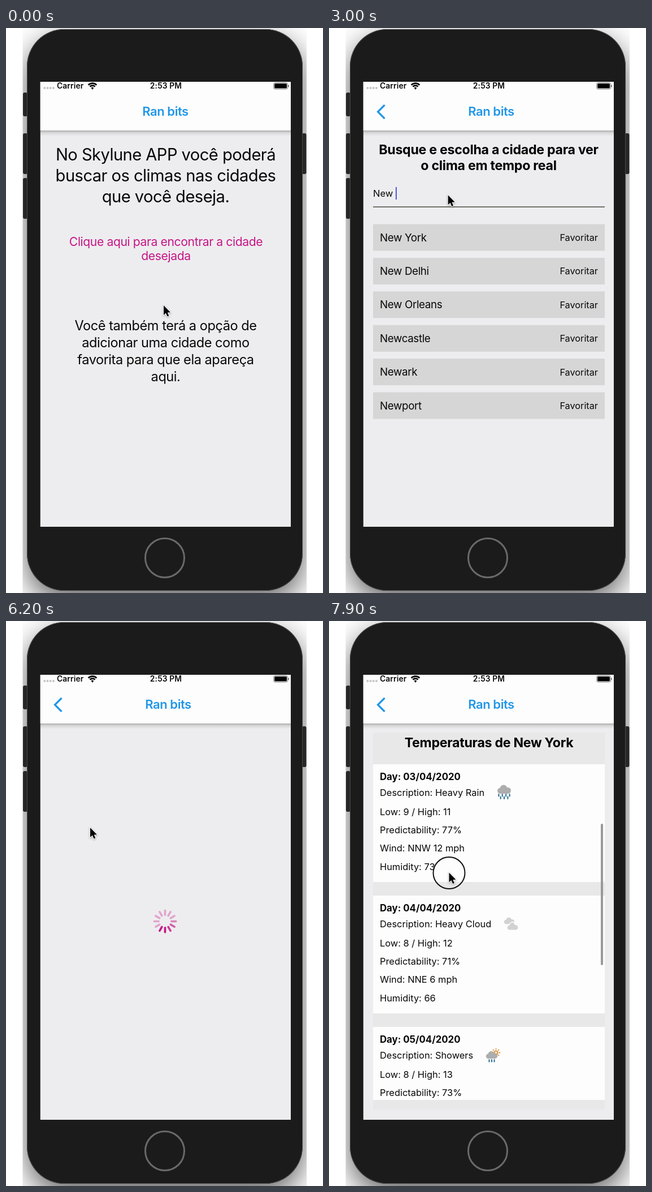
An HTML page with a canvas for the animation above (8000 ms loop, 561 by 998 pixels).

```html
<!DOCTYPE html>
<html lang="pt">
<head>
<meta charset="utf-8">
<title>Clima</title>
<style>
html, body { margin: 0; width: 561px; height: 998px; overflow: hidden; background: #fff; }
canvas { display: block; }
</style>
</head>
<body>
<canvas id="stage" width="561" height="998"></canvas>
<script>
const c = document.getElementById('stage').getContext('2d');
const LOOP = 8000, LEFT = 60.5, TOP = 95, W = 443.5, H = 786;
const BLUE = '#2196e8', PINK = '#c71585', BG = '#ededef', INK = '#080808';
const HEADING = { weight: 700, align: 'center', track: -.013, color: '#000' };

// Key lists: [time, value, value...]
const pointerKeys = [[0, 279, 490], [700, 252, 388], [1300, 246, 380], [1600, 217, 305],
  [2000, 214, 298], [3500, 209, 294], [4000, 207, 298], [4700, 160, 378], [5000, 159, 376],
  [5400, 149, 365], [7000, 149, 365], [7300, 214, 680]];
const openSearch = [[900, 0], [1000, .15], [1200, .15], [1300, .65], [1400, .9], [1600, 1]];
const openResult = [[5000, 0], [5100, .3], [5200, .75], [5300, .95], [5400, 1]];
const scrollKeys = [[7300, 0], [7400, 18], [7700, 180], [7900, 243]];
const typed = [[2300, 'N'], [2500, 'Ne'], [2700, 'New'], [3000, 'New '], [3300, 'New Y'], [3900, 'New Yo']];
const counts = [[2700, 9], [3000, 6], [3300, 3], [4100, 1]];
const cities = ['New York', 'New Delhi', 'New Orleans', 'Newcastle', 'Newark', 'Newport',
  'Geneva', 'Minneapolis', 'Budapest'];
const days = [
  ['02', 'Light Cloud', 6, 14, 70, 'NNW 12', 50, 313, 'sun'],
  ['03', 'Heavy Rain', 9, 11, 77, 'NNW 12', 73, 310, 'rain'],
  ['04', 'Heavy Cloud', 8, 12, 71, 'NNE 6', 66, 322, 'clouds'],
  ['05', 'Showers', 8, 13, 73, 'NNW 8', 61, 290, 'sun rain']];

function at(keys, t) {
  let i = keys.findIndex(k => k[0] > t);
  if (i < 0) return keys[keys.length - 1].slice(1);
  if (!i) return keys[0].slice(1);
  const a = keys[i - 1], b = keys[i], p = (t - a[0]) / (b[0] - a[0]);
  return a.slice(1).map((v, j) => v + (b[j + 1] - v) * p);
}
const latest = (list, t, none) => list.reduce((v, k) => k[0] <= t ? k[1] : v, none);

// Larger text is set tighter
function text(s, x, y, size, { color = INK, weight = 400, align = 'left', track = size < 18 ? 0 : -.02 } = {}) {
  c.font = `${weight} ${size}px Inter, sans-serif`;
  c.letterSpacing = size * track + 'px';
  c.textAlign = align;
  c.fillStyle = color;
  c.fillText(s, x, y);
}
const lines = (list, x, y, pitch, size, style) =>
  list.forEach((s, i) => text(s, x, y + i * pitch, size, { align: 'center', ...style }));
function box(x, y, w, h, color, r = 0) {
  c.fillStyle = color;
  c.beginPath();
  c.roundRect(x, y, w, h, r);
  c.fill();
}
function disc(x, y, r, color) {
  c.fillStyle = color;
  c.beginPath();
  c.arc(x, y, r, 0, 7);
  c.fill();
}
function stroke(color, width, draw) {
  c.strokeStyle = color;
  c.lineWidth = width;
  c.beginPath();
  draw();
  c.stroke();
}
function group(draw) {
  c.save();
  draw();
  c.restore();
}
function clip(x, y, w, h) {
  c.beginPath();
  c.rect(x, y, w, h);
  c.clip();
}

function phone() {
  box(0, 0, 561, 998, '#fff');
  group(() => {
    clip(29.5, 0, 502.5, 998);
    group(() => {
      c.shadowColor = 'rgba(0,0,0,.62)';
      c.shadowBlur = 50;
      c.shadowOffsetY = 18;
      box(37, 2, 488, 992, '#1b1b1b', 66);
    });
    [[30, 114, 42], [30, 186, 72], [30, 265, 72], [523.5, 186, 72]].forEach(([x, y, h]) => box(x, y, 8, h, '#272727', 3));
    box(37, 2, 488, 992, '#4a4a4a', 66);
    box(38, 3, 486, 990, '#1b1b1b', 65);
  });
  stroke('#6a6a6a', 3, () => c.arc(281, 936, 34.5, 0, 7));
}

function statusBar() {
  for (let i = 0; i < 4; i++) disc(68.3 + i * 5.2, 106, 2, '#c4c4c4');
  const style = { weight: 600, track: .01 };
  text('Carrier', 90, 107, 13.8, style);
  text('2:53 PM', 283, 107, 13.8, { ...style, align: 'center' });
  const arc = r => stroke('#000', 2.6, () => c.arc(153, 108, r, -2.36, -.78));
  arc(10.4);
  arc(6.4);
  c.fillStyle = '#000';
  c.beginPath();
  c.moveTo(153, 109);
  c.arc(153, 108, 3.2, -2.4, -.74);
  c.fill();
  stroke('#777', 1, () => c.roundRect(473.5, 96.5, 25, 11.5, 3));
  box(475, 98, 22, 8.5, '#000', 1.5);
  box(499.3, 100.5, 1.5, 4, '#777', 1);
}

function header(p) {
  const shade = c.createLinearGradient(0, 181, 0, 191);
  shade.addColorStop(0, 'rgba(0,0,0,.27)');
  shade.addColorStop(.4, 'rgba(0,0,0,.09)');
  shade.addColorStop(1, 'rgba(0,0,0,0)');
  box(LEFT, 181, W, 10, shade);
  box(LEFT, TOP, W, 86, '#fdfdfd');
  const title = x => text('Ran bits', x, 155, 22, { color: BLUE, weight: 600, align: 'center' });
  c.globalAlpha = 1 - p;
  title(282 - 150 * p);
  c.globalAlpha = p;
  title(287 + 150 * (1 - p));
  stroke(BLUE, 3.2, () => {
    c.moveTo(98.5, 136);
    c.lineTo(86.5, 148);
    c.lineTo(98.5, 160);
  });
  c.globalAlpha = 1;
  statusBar();
}

function home(t) {
  lines(['No Skylune APP você poderá', 'buscar os climas nas cidades', 'que você deseja.'], 282.5, 234, 37, 29.2);
  c.globalAlpha = t >= 800 && t < 1000 ? .4 : 1;
  lines(['Clique aqui para encontrar a cidade', 'desejada'], 283, 384.5, 25.5, 21.2, { color: PINK });
  c.globalAlpha = 1;
  lines(['Você também terá a opção de', 'adicionar uma cidade como', 'favorita para que ela apareça', 'aqui.'], 282.5, 533.5, 30, 23.6);
}

function search(t) {
  lines(['Busque e escolha a cidade para ver', 'o clima em tempo real'], 282.5, 223, 28, 23.2, HEADING);
  const s = latest(typed, t, '');
  text(s || 'Digite o nome da cidade...', 78, 298, 16.5, { color: s ? INK : '#b3b3b7' });
  if (t >= 2000 && t < 4600 && (t - 1900) % 1000 < 700)
    box(78 + (s ? c.measureText(s).width : 0), 281, 2, 22, '#4a55d8');
  box(78, 315.2, 410, 1.6, '#4b4b40');
  cities.slice(0, latest(counts, t, 0)).forEach((name, i) => {
    const y = 346.5 + i * 59.4;
    box(78, y, 410, 47, '#d6d6d6');
    text(name, 90, y + 30, 18.8);
    text('Favoritar', 476, y + 29.5, 16.3, { align: 'right' });
  });
}

function spinner(t) {
  const lead = Math.floor(t * .012) + 5;
  for (let i = 0; i < 12; i++) group(() => {
    const age = (lead - i + 1200) % 12;
    c.translate(281.5, 530.5);
    c.rotate(i * Math.PI / 6);
    c.globalAlpha = Math.max(.33, 1 - Math.max(0, age - 1) * .17);
    box(-1.8, -21, 3.6, 11.5, PINK, 1.8);
  });
}

function sun(x, y, r) {
  for (let a = 0; a < 8; a++) stroke('#d58a2e', 1.8, () => {
    const dx = Math.cos(a * Math.PI / 4), dy = Math.sin(a * Math.PI / 4);
    c.moveTo(x + dx * r * 1.35, y + dy * r * 1.35);
    c.lineTo(x + dx * r * 1.9, y + dy * r * 1.9);
  });
  disc(x, y, r, '#d58a2e');
  disc(x, y, r * .6, '#f6dfbd');
}
function cloud(x, y, k, color) {
  disc(x - 7 * k, y + 2 * k, 5 * k, color);
  disc(x - 1 * k, y - 2 * k, 6.5 * k, color);
  disc(x + 6.5 * k, y + 1.5 * k, 5.5 * k, color);
  box(x - 8 * k, y, 15 * k, 7 * k, color, 2 * k);
}
function drops(x, y, count, gap, stagger) {
  for (let i = 0; i < count; i++)
    box(x + (i - (count - 1) / 2) * gap - 1, y + i % 2 * stagger, 2, 5.5, '#286b8c', 1);
}
const icons = {
  sun(x, y) {
    sun(x + 2.5, y - 1, 6);
    cloud(x - .5, y + 5.5, 1, '#d2d2d2');
  },
  rain(x, y) {
    cloud(x, y - 5, 1, '#adadad');
    drops(x, y + 2, 7, 3.2, 4.5);
  },
  clouds(x, y) {
    cloud(x - 3, y - 5, .75, '#d2d2d2');
    stroke('#fff', 1.5, () => c.arc(x + 3, y + 3, 6, 3.2, 5.8));
    cloud(x + 3, y + 5, .78, '#d2d2d2');
  },
  'sun rain'(x, y) {
    sun(x + 5.5, y - 4.5, 4);
    cloud(x - 2, y, .85, '#adadad');
    drops(x - 2, y + 7, 3, 4.5, 0);
  }
};

function result(t) {
  if (t < 6600) return spinner(t);
  const scroll = at(scrollKeys, t)[0];
  box(78, 197, 410, 666, '#e8e8e9');
  text('Temperaturas de New York', 283, 223, 23.2, HEADING);
  group(() => {
    clip(78, 252, 410, 594);
    days.forEach(([day, sky, low, high, sure, wind, wet, x, kind], i) => {
      const y = 264 + i * 232 - scroll;
      box(78, y, 410, 208, '#fdfdfd');
      text(`Day: ${day}/04/2020`, 90, y + 28, 16.8, { weight: 700 });
      [[56, `Description: ${sky}`], [90, `Low: ${low} / High: ${high}`], [122, `Predictability: ${sure}%`],
        [154, `Wind: ${wind} mph`], [186.5, `Humidity: ${wet}`]].forEach(([dy, s]) => text(s, 90, y + dy, 16.4));
      icons[kind](x, y + 50);
    });
  });
  if (scroll) box(481, 256 + scroll * .42, 4, 250, '#999', 2);
}

function pointer(t) {
  const drag = t >= 7300;
  const [x, y] = drag ? [212.5, 444.5 + 243 - at(scrollKeys, t)[0]] : at(pointerKeys, t);
  if (drag) stroke('#111', 2, () => c.arc(x, y + .5, 28, 0, 7));
  group(() => {
    c.translate(x, y);
    c.beginPath();
    [[0, 0], [0, 17], [3.8, 13.4], [6.6, 19.6], [9.4, 18.4], [6.8, 12.4], [12, 12.2]].forEach(p => c.lineTo(...p));
    c.closePath();
    c.shadowColor = 'rgba(0,0,0,.35)';
    c.shadowBlur = 3;
    c.shadowOffsetY = 1;
    c.strokeStyle = '#fff';
    c.lineWidth = 2;
    c.stroke();
    c.shadowColor = 'transparent';
    c.fillStyle = '#000';
    c.fill();
  });
}

function page(draw, shift, t) {
  group(() => {
    c.translate(shift * W, 0);
    box(LEFT, TOP, W, H, BG);
    draw(t);
  });
}
function push(from, to, p, t) {
  if (p < 1) page(from, -.3 * p, t);
  if (p > 0) page(to, 1 - p, t);
}

function draw(t) {
  phone();
  const p = at(openSearch, t)[0];
  group(() => {
    clip(LEFT, TOP, W, H);
    if (t < 5000) push(home, search, p, t);
    else push(search, result, at(openResult, t)[0], t);
    header(p);
    pointer(t);
  });
}

function tick(now) {
  draw(Math.floor(now % LOOP / 100) * 100);
  requestAnimationFrame(tick);
}
requestAnimationFrame(tick);
</script>
</body>
</html>
```
